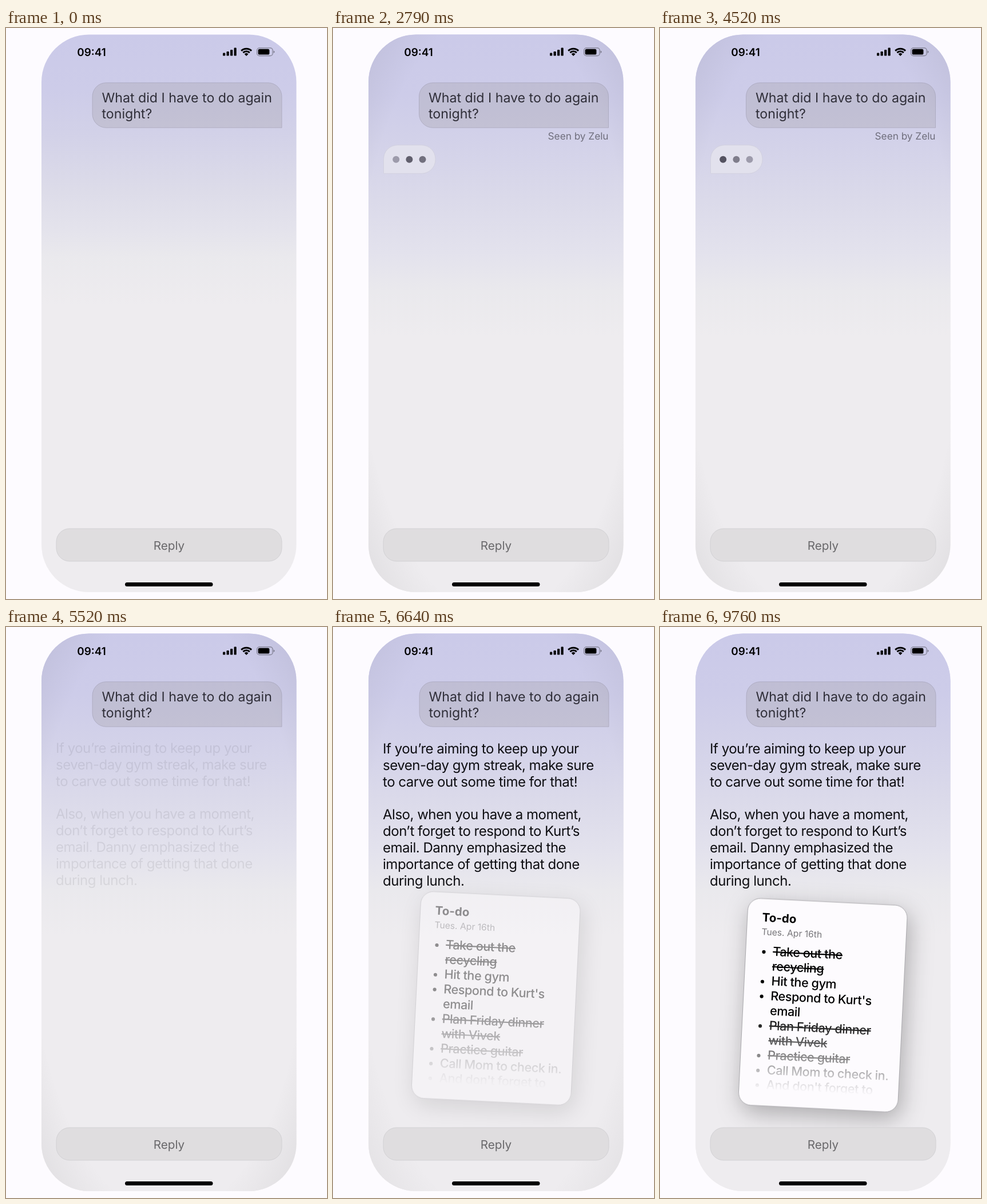
Write an HTML page that moves like this. It is 561 by 998 pixels and loops after 9880 ms.

```html
<!DOCTYPE html>
<html lang="en">
<head>
<meta charset="utf-8">
<title>Assistant chat</title>
<style>
  html, body { margin: 0; width: 100%; height: 100%; overflow: hidden; background: #fdfbff; }
  svg { display: block; width: 561px; height: 998px; }
  text {
    font-family: Inter, Roboto, sans-serif;
    font-optical-sizing: none;
    text-rendering: geometricPrecision;
    white-space: pre;
  }
  .ask { font-size: 23.15px; fill: #2f2e38; }
  .seen { font-size: 17.2px; fill: #6f6e7c; text-anchor: end; }
  .body { font-size: 24px; letter-spacing: -.02em; fill: #0e0e12; }
  .reply { font-size: 20.7px; fill: #69686b; text-anchor: middle; }
  .clock { font-size: 18.9px; font-weight: 600; }
  .title { font-size: 20.5px; font-weight: 700; }
  .date { font-size: 15.7px; fill: #78777b; }
  .item { font-size: 21.6px; font-weight: 500; letter-spacing: -.02em; }
  .done { text-decoration: line-through; }
  .sheet { filter: drop-shadow(5px 12px 20px rgba(0, 0, 0, .28)); }
</style>
</head>
<body>
<svg viewBox="0 0 561 998">
  <defs>
    <linearGradient id="short" gradientUnits="userSpaceOnUse" x1="0" y1="12" x2="0" y2="486">
      <stop offset="0" stop-color="#cbcae9"/>
      <stop offset=".2" stop-color="#cdcce9"/>
      <stop offset=".36" stop-color="#d2d1e8"/>
      <stop offset=".58" stop-color="#dddce9"/>
      <stop offset=".72" stop-color="#e4e3ec"/>
      <stop offset=".82" stop-color="#eae9ed"/>
      <stop offset="1" stop-color="#eeecef"/>
    </linearGradient>
    <linearGradient id="long" gradientUnits="userSpaceOnUse" x1="0" y1="12" x2="0" y2="540">
      <stop offset="0" stop-color="#cbcae9"/>
      <stop offset=".2" stop-color="#cdcce9"/>
      <stop offset=".34" stop-color="#d2d1e9"/>
      <stop offset=".55" stop-color="#dbdaea"/>
      <stop offset=".72" stop-color="#e3e2ed"/>
      <stop offset=".85" stop-color="#eae9ed"/>
      <stop offset="1" stop-color="#eeecef"/>
    </linearGradient>
    <radialGradient id="corners" cx=".5" cy=".5" r=".66">
      <stop offset=".82" stop-color="#555" stop-opacity="0"/>
      <stop offset="1" stop-color="#555" stop-opacity=".07"/>
    </radialGradient>
    <linearGradient id="fadeDown" gradientUnits="userSpaceOnUse" x1="0" y1="20" x2="0" y2="154">
      <stop offset="0" stop-color="#fff"/>
      <stop offset="1" stop-color="#000"/>
    </linearGradient>
    <mask id="listMask" maskUnits="userSpaceOnUse" x="-140" y="-181" width="280" height="362">
      <rect x="-140" y="-181" width="280" height="362" fill="url(#fadeDown)"/>
    </mask>
  </defs>

  <rect width="561" height="998" fill="#fdfbff"/>
  <rect class="shell" fill="url(#short)"/>
  <rect class="shell" id="longTint" fill="url(#long)"/>
  <rect class="shell" id="shade" fill="url(#corners)"/>

  <!-- status bar -->
  <text class="clock" x="124.2" y="48.9">09:41</text>
  <g id="bars"></g>
  <g fill="none" stroke="#000" stroke-width="3">
    <path d="M411.2 39.8a12.8 12.8 0 0 1 17.8 0"/>
    <path d="M414.4 43.1a8.2 8.2 0 0 1 11.4 0"/>
    <path d="M416.7 45.4a5 5 0 0 1 6.8 0L420.1 49z" fill="#000" stroke="none"/>
  </g>
  <rect x="438.6" y="34.8" width="27.6" height="13.8" rx="4.4" fill="none" stroke="#000" stroke-opacity=".38" stroke-width="1.2"/>
  <rect x="440.6" y="36.8" width="19.8" height="9.8" rx="2.6"/>
  <path d="M467.7 39.4q1.8.7 1.8 2.3t-1.8 2.3z" fill-opacity=".42"/>

  <!-- question -->
  <g id="ask">
    <path d="M175 95.7H458A24 24 0 0 1 482 119.7V174.3H175A24 24 0 0 1 151 150.3V119.7A24 24 0 0 1 175 95.7z"
      fill="rgb(135,130,125)" fill-opacity=".19" stroke="#8f8d9f" stroke-opacity=".42"/>
    <text class="ask" x="167.5" y="130">What did I have to do again</text>
    <text class="ask" x="167.5" y="157.6">tonight?</text>
  </g>
  <text class="seen" id="seen" x="481.5" y="195.3">Seen by Zelu</text>

  <!-- typing bubble -->
  <g id="typing">
    <path d="M112.5 204.7H155A24 24 0 0 1 179 228.7V230.3A24 24 0 0 1 155 254.3H88.5V228.7A24 24 0 0 1 112.5 204.7z"
      fill="#e2e1ed" stroke="#d2d1df"/>
    <circle cx="110.2" cy="229.8" r="6"/>
    <circle cx="133.4" cy="229.8" r="6"/>
    <circle cx="156.5" cy="229.8" r="6"/>
  </g>

  <g id="answer"></g>

  <!-- note card -->
  <g id="card">
    <g class="sheet">
      <rect x="-139.5" y="-180.9" width="279" height="361.8" rx="22" fill="#fdfbfe" stroke="#aaa9ad"/>
    </g>
    <text class="title" x="-113.5" y="-141">To-do</text>
    <text class="date" x="-113.5" y="-117.5">Tues. Apr 16th</text>
    <g id="list" mask="url(#listMask)"></g>
  </g>

  <rect x="88" y="875" width="394" height="57" rx="23" fill="#dfdddf" stroke="#d2d1d4"/>
  <text class="reply" x="285" y="911.5">Reply</text>
  <rect x="208" y="969" width="153.5" height="7" rx="3.5"/>
</svg>

<script>
const LOOP = 9880;
const $ = id => document.getElementById(id);

function add(parent, tag, attrs, text) {
  const el = document.createElementNS('http://www.w3.org/2000/svg', tag);
  for (const key in attrs) el.setAttribute(key, attrs[key]);
  if (text) el.textContent = text;
  parent.append(el);
  return el;
}

const shell = { x: 62, y: 11.5, width: 445.5, height: 974.5, rx: 83 };
for (const el of document.querySelectorAll('.shell'))
  for (const key in shell) el.setAttribute(key, shell[key]);

[5, 7.5, 10.5, 14].forEach((height, i) =>
  add($('bars'), 'rect', { x: 379 + i * 6.5, y: 48.6 - height, width: 4.2, height, rx: 1.2 }));

[
  'If you’re aiming to keep up your',
  'seven-day gym streak, make sure',
  'to carve out some time for that!',
  '',
  'Also, when you have a moment,',
  'don’t forget to respond to Kurt’s',
  'email. Danny emphasized the',
  'importance of getting that done',
  'during lunch.'
].forEach((line, i) => add($('answer'), 'text', { class: 'body', x: 87, y: 221.2 + i * 28.8 }, line));

// each entry: wrapped lines, then whether it is crossed out
let row = 0;
[
  [['Take out the', 'recycling'], true],
  [['Hit the gym']],
  [["Respond to Kurt's", 'email']],
  [['Plan Friday dinner', 'with Vivek'], true],
  [['Practice guitar'], true],
  [['Call Mom to check in.']],
  [["And don't forget to"]]
].forEach(([lines, done]) => lines.forEach((line, i) => {
  const y = -82 + 25.92 * row++;
  if (!i) add($('list'), 'circle', { cx: -107.7, cy: y - 5.8, r: 3.1 });
  add($('list'), 'text', { class: done ? 'item done' : 'item', x: -92, y }, line);
}));

const ramp = (t, from, to) => Math.min(1, Math.max(0, (t - from) / (to - from)));
const easeOut = p => 1 - (1 - p) ** 2;
const fade = (id, value) => $(id).setAttribute('opacity', value);
const move = (id, value) => $(id).setAttribute('transform', value);
const dots = document.querySelectorAll('#typing circle');

function draw(t) {
  const waiting = t < 5000;

  fade('longTint', ramp(t, 210, 1210));
  fade('shade', ramp(t, 1210, 1400) * (1 - ramp(t, 6420, 7450)));
  fade('seen', waiting ? ramp(t, 210, 550) : 0);
  move('ask', `translate(${waiting ? -.5 * ramp(t, 210, 550) : 0} 0)`);

  // a pulse passes over the dots once a second
  fade('typing', waiting ? ramp(t, 1200, 1400) : 0);
  dots.forEach((dot, i) => {
    const level = t < 1210 ? 0 : Math.max(0, 1 - Math.abs(t % 1000 - 450 - i * 240) / 240);
    const mix = (a, b) => Math.round(a + (b - a) * level);
    dot.setAttribute('fill', `rgb(${mix(157, 54)},${mix(155, 52)},${mix(171, 64)})`);
  });

  const shown = easeOut(ramp(t, 5500, 6030));
  fade('answer', shown);
  move('answer', `translate(0 ${shown - 1})`);

  const drop = ramp(t, 6400, 7000);
  fade('card', drop);
  move('card', `translate(284.7 ${661 - 20 * (1 - drop)}) rotate(2.85)`);
}

function tick() {
  draw(performance.now() % LOOP);
  requestAnimationFrame(tick);
}
tick();
</script>
</body>
</html>
```
